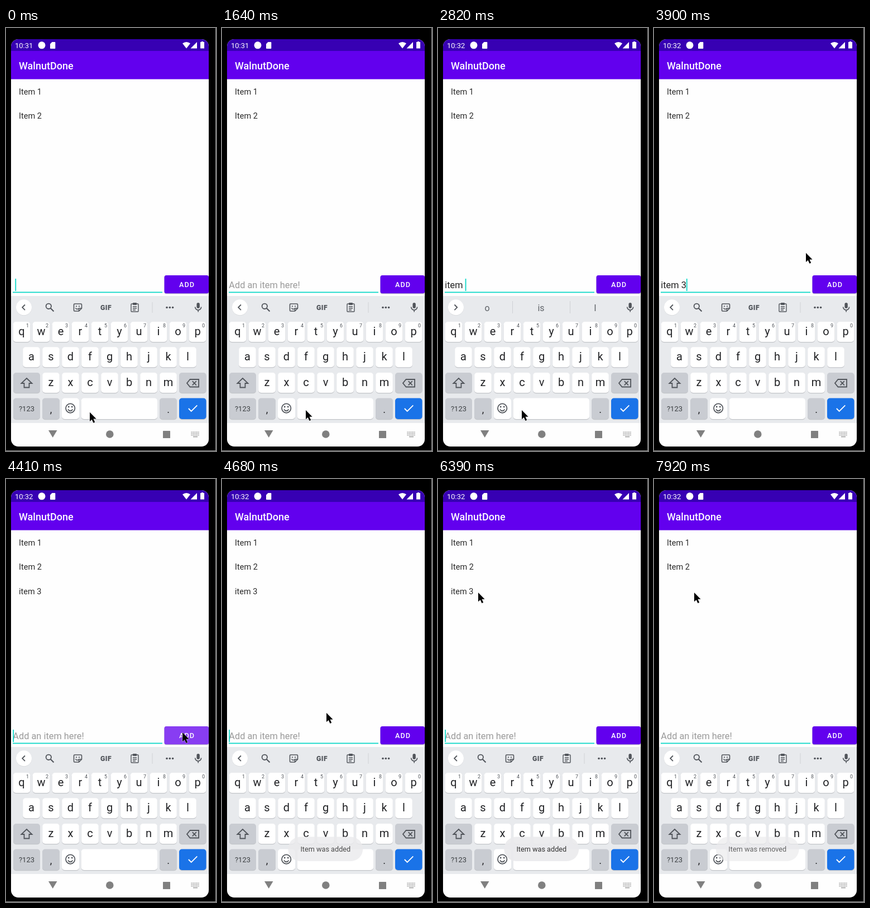
These frames come from a looping animation (376x756 px, 8 s). An HTML page:

```html
<!DOCTYPE html>
<html lang="en">
<head>
<meta charset="utf-8">
<title>To-do list</title>
<style>
  html, body { margin: 0; width: 100%; height: 100%; overflow: hidden; background: #000; }
  svg { display: block; width: 100%; height: 100%; }
  text { font-family: Roboto, "Noto Sans", sans-serif; white-space: pre; }
</style>
</head>
<body>
<svg id="stage" viewBox="0 0 376 756"></svg>
<script>
const LOOP = 8000;
const INK = '#202124', GREY = '#50545a';
const stage = document.getElementById('stage');

function el(tag, attrs, parent = stage) {
  const node = document.createElementNS('http://www.w3.org/2000/svg', tag);
  for (const k in attrs) node.setAttribute(k, attrs[k]);
  parent.appendChild(node);
  return node;
}
const group = (parent = stage) => el('g', {}, parent);
const rect = (x, y, width, height, fill, rx = 0, parent = stage) =>
  el('rect', { x, y, width, height, fill, rx }, parent);
const circle = (cx, cy, r, fill, parent = stage) => el('circle', { cx, cy, r, fill }, parent);
const shape = (d, fill, parent = stage) => el('path', { d, fill }, parent);
const line = (d, stroke, width, parent = stage) =>
  el('path', { d, stroke, 'stroke-width': width, fill: 'none' }, parent);
function label(str, x, y, size, fill, opts = {}, parent = stage) {
  const node = el('text', { x, y, 'font-size': size, fill, ...opts }, parent);
  node.textContent = str;
  return node;
}
const MID = { 'text-anchor': 'middle' };
const show = (node, on) => node.setAttribute('visibility', on ? 'visible' : 'hidden');

// Screen and bars
rect(0, 0, 376, 756, '#000');
rect(375, 0, 1, 756, '#999');
rect(0, 755, 376, 1, '#999');
rect(9, 20, 354, 728, '#fefefe', 13);
shape('M9 42V33a13 13 0 0 1 13-13H350a13 13 0 0 1 13 13V42Z', '#3700b3');
rect(9, 41, 354, 50.5, '#6200ee');
const clock = label('', 16, 35.5, 13, '#fff');
circle(64, 30.8, 6.5, '#fff');
shape('M82.5 25H87.3a1 1 0 0 1 1 1V36a1 1 0 0 1-1 1H80a1 1 0 0 1-1-1V28.5Z', '#fff');
shape('M316 27.6Q323 22.2 330 27.6L323 36.5Z', '#fff');
shape('M342 25V36.5H330.5Z', '#fff');
shape('M350 25V24H353V25H355V36.5H348V25Z', '#fff');
label('WalnutDone', 23, 74, 18, '#fff', { 'font-weight': 500 });

// List
const rows = ['Item 1', 'Item 2', 'item 3'].map((s, i) =>
  label(s, 23, 119 + 43.3 * i, 14.5, '#2a2a2a'));

// Input and button
rect(12, 471.5, 268, 1.8, '#10d8c8');
const hint = label('Add an item here!', 12.3, 465.3, 16.35, '#9a9a9a');
const typed = label('', 12.3, 465.3, 16.35, '#222');
const caret = rect(0, 448, 1.8, 22, '#10d8c8');
rect(283.5, 443.3, 79.5, 32, '#b9b9c4', 3.5);
rect(283.5, 442, 79.5, 32.3, '#6200ee', 3.5);
const ripple = rect(283.5, 442, 79.5, 32.3, '#fff', 3.5);
label('ADD', 324, 463, 12.6, '#fff', { ...MID, 'font-weight': 500, 'letter-spacing': 1.12 });

// Keyboard strip
rect(9, 479, 354, 227, '#e8eaed');
circle(32, 500, 14, '#d5d7da');
circle(32, 499.3, 14, '#fff');
const chevron = line('', GREY, 1.8);

const tools = group();
el('circle', { cx: 76.3, cy: 497.3, r: 4.7, fill: 'none', stroke: GREY, 'stroke-width': 1.8 }, tools);
line('M79.7 500.7L85.5 506.5', GREY, 2, tools);
line('M123 493H134a1.5 1.5 0 0 1 1.5 1.5V501L130.5 506H123a1.5 1.5 0 0 1-1.5-1.5V494.5a1.5 1.5 0 0 1 1.5-1.5ZM130.5 506V501H135.5M124.5 500.5Q127 504 129.5 501.5', GREY, 1.6, tools);
circle(126, 497.3, 1.1, GREY, tools);
circle(131, 497.3, 1.1, GREY, tools);
label('GIF', 179, 503.7, 12.2, GREY, { ...MID, 'font-weight': 900, 'letter-spacing': 0.5 }, tools);
line('M225 493H236a1 1 0 0 1 1 1V506a1 1 0 0 1-1 1H225a1 1 0 0 1-1-1V494a1 1 0 0 1 1-1ZM227 498H234M227 501H234M227 504H232', GREY, 1.4, tools);
rect(227, 491, 7, 4, GREY, 1, tools);
rect(261.5, 490, 1, 19, '#cfd1d5', 0, tools);
for (const x of [288, 293.3, 298.6]) circle(x, 499.5, 1.8, GREY, tools);

const words = group();
rect(133, 488, 1, 22, '#cfd1d5', 0, words);
rect(236, 488, 1, 22, '#cfd1d5', 0, words);
const slots = [88, 184.5, 281.5].map(x => label('', x, 506, 16, '#5f6368', MID, words));

rect(341.4, 491, 5.4, 10, GREY, 2.7);
line('M338.6 498.5a5.5 5.5 0 0 0 11 0M344.1 504V507.5', GREY, 1.6);

// Keys
function key(x, y, w, fill = '#fff', h = 36) {
  rect(x, y + 1.2, w, h, '#c3c5c9', 5);
  rect(x, y, w, h, fill, 5);
}
function keyRow(chars, x, y, hints) {
  [...chars].forEach((c, i) => {
    const cx = x + 35 * i;
    key(cx - 15.3, y, 30.6);
    label(c, cx, y + 24, 20, INK, MID);
    if (hints) label(hints[i], cx + 10.5, y + 10, 9, GREY, MID);
  });
}
const DIM = '#c9ccd2';
keyRow('qwertyuiop', 28, 525, '1234567890');
keyRow('asdfghjkl', 45.5, 570.3);
keyRow('zxcvbnm', 80.5, 616);
key(13, 616, 48, DIM);
line('M37 626L46.5 635H41.5V642.5H32.5V635H27.5Z', GREY, 1.8);
key(310, 616, 48.5, DIM);
line('M329.5 628H345V641.5H329.5L324 634.8ZM333.7 631.2L340.8 638.3M340.8 631.2L333.7 638.3', GREY, 1.8);
key(13, 661.5, 48, DIM, 37.5);
label('?123', 37, 685.3, 13, '#3c4043', MID);
key(65, 661.5, 31, DIM, 37.5);
label(',', 80.5, 688, 18, INK, MID);
key(100, 661.5, 31, '#fff', 37.5);
el('circle', { cx: 115.2, cy: 679.6, r: 8.2, fill: 'none', stroke: GREY, 'stroke-width': 1.7 });
circle(112.2, 677, 1.4, GREY);
circle(118.2, 677, 1.4, GREY);
line('M110.9 681.6Q115.2 687 119.5 681.6', GREY, 1.7);
key(134.7, 661.5, 136.3, '#fff', 37.5);
key(275, 661.5, 31, DIM, 37.5);
label('.', 290.5, 688, 18, INK, MID);
key(310, 661.5, 48.5, '#1a73e8', 37.5);
line('M326.8 680L331.7 684.9L342.3 674.3', '#fff', 1.8);

// Navigation bar
shape('M76 719H91.5L83.7 732Z', '#808080');
circle(185.8, 726, 6.8, '#808080');
rect(281, 720, 13, 13, '#808080', 0.5);
for (let r = 0; r < 3; r++)
  for (let c = 0; c < 6; c++) rect(331.5 + c * 2.5, 721.5 + r * 2.7, 1.5, 1.6, '#9a9a9a');
rect(335, 729.8, 8, 1.5, '#9a9a9a');

// Toast
const toast = group();
const toastBox = rect(118, 639.5, 134, 43.5, '#ebebed', 21.7, toast);
toastBox.setAttribute('fill-opacity', 0.93);
const toastText = label('', 185.3, 665.6, 12.7, '#333', MID, toast);

// Pointer
const pointer = shape('M0 0V16.3L3.7 12.9L6.5 19L9.2 17.8L6.5 11.8H11.6Z', '#000');
pointer.setAttribute('stroke', '#fff');
pointer.setAttribute('stroke-width', 0.8);
pointer.setAttribute('paint-order', 'stroke');

// Tracks of [time, value]; each value holds until the next one
const CLOCK = [[0, '10:31'], [2280, '10:32']];
const TEXT = [[0, ' '], [1110, ''], [2010, 'i'], [2150, 'it'], [2420, 'ite'], [2550, 'item'],
  [2680, 'item '], [3630, 'item 3'], [4380, '']];
const CARET = [[0, 1], [400, 0], [830, 1], [1640, 0], [2010, 1], [3350, 0], [3630, 1],
  [5380, 0], [5810, 1], [6510, 0], [6810, 1], [7370, 0], [7770, 1], [7920, 0]];
const WORDS = [[0, ''], [2010, 'in i is'], [2150, 'it’s it is'], [2420, 'item ite items'],
  [2550, 'items item itemize'], [2820, 'o is I'], [3630, '']];
const POINTER = [[0, [150, 686.8]], [550, [150, 683]], [3780, [222, 530]], [3900, [272, 402]],
  [4020, [309, 440]], [4140, [316, 453]], [4680, [187, 418]], [4800, [136, 332]],
  [5070, [129, 328]], [5660, [110, 285]], [5810, [78, 216]], [5960, [72, 203]]];
const RIPPLE = [[0, 0], [4260, 0.24], [4530, 0.12], [4680, 0]];
const TOAST = [[0, 0], [4530, 0.4], [4680, 0.88], [4800, 1], [6510, 0.65], [6630, 0.3],
  [6810, 0], [7770, 0.35], [7920, 0.75]];

function at(track, t) {
  let value = track[0][1];
  for (const [start, v] of track) if (start <= t) value = v;
  return value;
}

function draw(t) {
  clock.textContent = at(CLOCK, t);

  const text = at(TEXT, t);
  typed.textContent = text;
  show(hint, !text);
  caret.setAttribute('x', 12.3 + (text ? typed.getComputedTextLength() : 0));
  show(caret, at(CARET, t));

  const picks = at(WORDS, t);
  show(tools, !picks);
  show(words, picks);
  picks.split(' ').forEach((w, i) => { slots[i].textContent = w; });
  chevron.setAttribute('d', picks ? 'M29.5 494.5L34.3 499.3L29.5 504.1' : 'M34 494.5L29.2 499.3L34 504.1');

  show(rows[2], t >= 4380 && t < 7770);
  ripple.setAttribute('opacity', at(RIPPLE, t));

  const removed = t >= 7770, width = removed ? 149 : 134;
  toast.setAttribute('opacity', at(TOAST, t));
  toastText.textContent = removed ? 'Item was removed' : 'Item was added';
  toastBox.setAttribute('width', width);
  toastBox.setAttribute('x', 185.3 - width / 2);

  pointer.setAttribute('transform', `translate(${at(POINTER, t)})`);
}

const begin = performance.now();
function tick() {
  draw((performance.now() - begin) % LOOP);
  requestAnimationFrame(tick);
}
tick();
</script>
</body>
</html>
```
